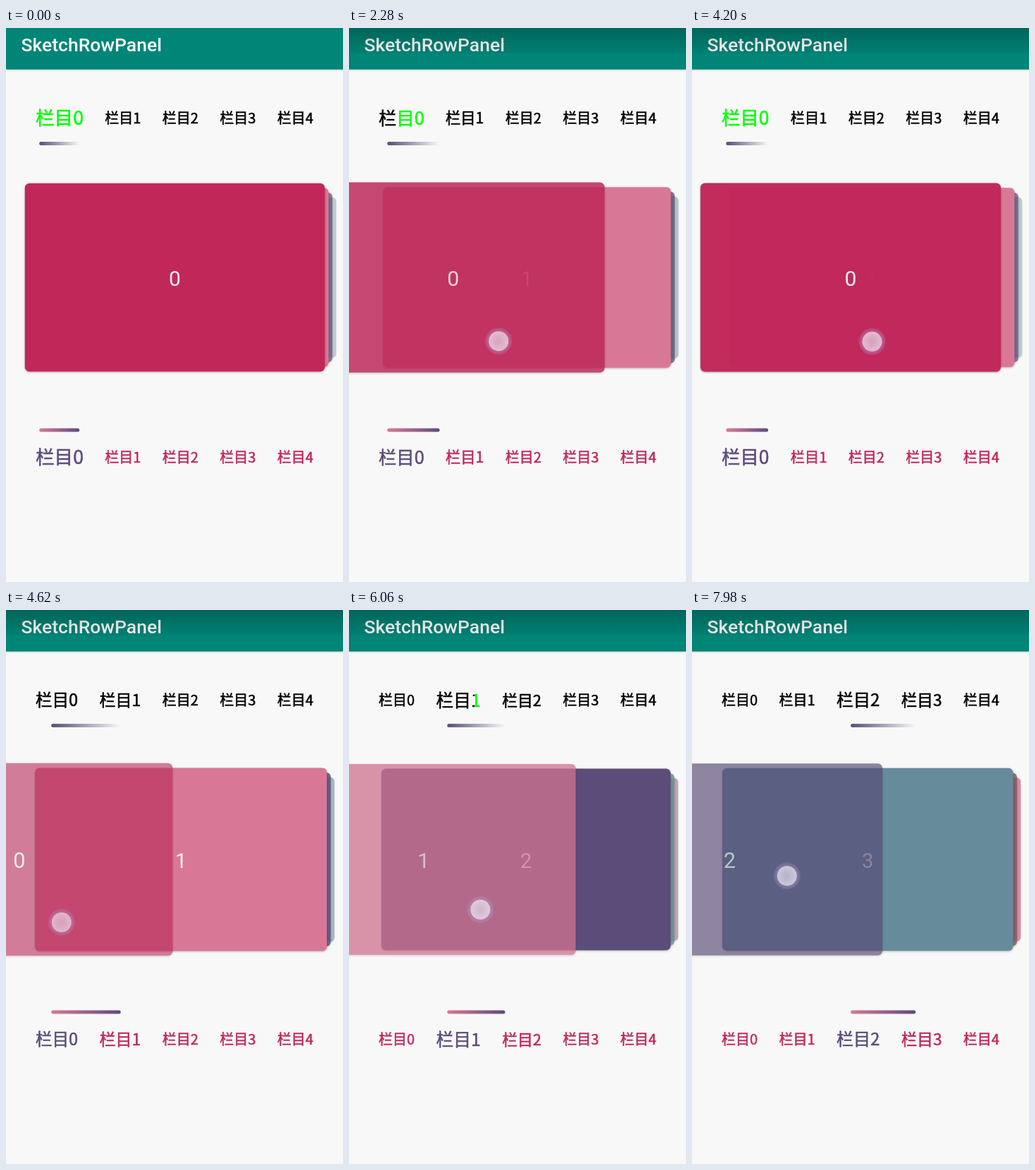
An HTML page that plays this animation: 478x784 px, repeating every 8000 ms.

```html
<!DOCTYPE html>
<html lang="zh">
<head>
<meta charset="utf-8">
<title>SketchRowPanel</title>
<style>
  html, body { margin: 0; width: 100%; height: 100%; overflow: hidden; background: #f8f8f8; }
  svg { display: block; width: 478px; height: 784px; }
  .title { font: 500 26.5px Roboto, sans-serif; fill: #fff; }
  .tab { font-family: "Noto Sans CJK SC", "Noto Sans CJK", sans-serif; font-weight: 500; stroke-width: .55px; stroke-linejoin: round; }
  .card { filter: drop-shadow(0 1px 1.5px rgba(0, 0, 0, .28)); }
  .card text { font: 30px Roboto, sans-serif; fill: #fff; fill-opacity: .93; text-anchor: middle; }
  .bar { filter: drop-shadow(0 1px 1px rgba(0, 0, 0, .18)); }
</style>
</head>
<body>
<svg viewBox="0 0 478 784">
  <defs>
    <linearGradient id="shade" x2="0" y2="1">
      <stop offset="0" stop-opacity=".24"/>
      <stop offset="1" stop-opacity=".04"/>
    </linearGradient>
    <linearGradient id="fade">
      <stop offset="0" stop-color="#5b4c7a"/>
      <stop offset="1" stop-color="#5b4c7a" stop-opacity="0"/>
    </linearGradient>
    <linearGradient id="blend">
      <stop offset="0" stop-color="#d97896"/>
      <stop offset="1" stop-color="#5b4c7a"/>
    </linearGradient>
    <radialGradient id="tip">
      <stop offset="0" stop-color="#fff" stop-opacity=".42"/>
      <stop offset="1" stop-color="#fff" stop-opacity=".6"/>
    </radialGradient>
  </defs>
  <rect width="478" height="784" fill="#f8f8f8"/>
  <rect class="bar" width="478" height="58.7" fill="#008577"/>
  <text class="title" x="21.5" y="33">SketchRowPanel</text>
  <rect id="dim" width="478" height="36" fill="url(#shade)"/>
  <g id="tabs"></g>
  <rect id="topLine" y="161" height="5" rx="2.5" fill="url(#fade)"/>
  <rect id="lowLine" y="566.5" height="5" rx="2.5" fill="url(#blend)"/>
  <g id="cards"></g>
  <g id="touch">
    <circle r="19" fill="#b59ad0" fill-opacity=".25"/>
    <circle r="16.5" fill="#b59ad0" fill-opacity=".2"/>
    <circle r="14" fill="url(#tip)"/>
  </g>
</svg>
<script>
const LOOP = 8000, PAGE = 478, CX = 239.5, CY = 353;
const COLORS = ['#c2275a', '#d97896', '#5b4c7a', '#668c9c', '#7f5a60'];

// Each swipe: finger down, drag, lift at a page position, then settle.
const SWIPES = [
  { down: 1260, drag: 1740, lift: 3190, end: 3770, from: 0, at: .462, to: 0, pow: .89, x: 304, y: [445, 440] },
  { down: 3930, drag: 3930, lift: 4600, end: 5190, from: 0, at: .4, to: 1, pow: 2.85, x: 270, y: [445, 442] },
  { down: 5430, drag: 5430, lift: 6480, end: 7020, from: 1, at: 1.6, to: 2, pow: 1.5, x: 320, y: [430, 420] },
  { down: 7230, drag: 7230, lift: 8000, end: 8500, from: 2, at: 2.4015, to: 3, pow: 1.2, x: 321, y: [386, 376] }
];

const $ = id => document.getElementById(id);
const clamp = v => Math.max(0, Math.min(1, v));
const mix = (a, b, u) => a + (b - a) * u;

function make(tag, attrs, parent) {
  const el = document.createElementNS('http://www.w3.org/2000/svg', tag);
  set(el, attrs);
  parent.append(el);
  return el;
}

function set(el, attrs) {
  for (const k in attrs) el.setAttribute(k, attrs[k]);
}

const tabs = [0, 1, 2, 3, 4].map(i => {
  const grad = make('linearGradient', { id: 'ink' + i }, document.querySelector('defs'));
  const stops = ['a', 'b'].map(() => make('stop', {}, grad));
  const label = ink => {
    const el = make('text', { class: 'tab', fill: ink, stroke: ink }, $('tabs'));
    el.textContent = '栏目' + i;
    return el;
  };
  return { stops, top: label(`url(#ink${i})`), low: label('#c2275a') };
});

const cards = [];
for (let i = 5; i >= 0; i--) {
  const box = make('g', {}, $('cards'));
  const size = { x: -212.75, y: -133.2, width: 425.5, height: 266.4, rx: 6.5 };
  const under = make('rect', size, box);
  const face = make('g', { class: 'card' }, box);
  make('rect', { ...size, fill: COLORS[i % 5] }, face);
  make('text', { y: 12 }, face).textContent = i;
  cards[i] = { box, under, face };
}

function dragPos(s, t) {
  return mix(s.from, s.at, clamp((t - s.drag) / (s.lift - s.drag)) ** s.pow);
}

function pagePos(s, t) {
  if (t < s.lift) return dragPos(s, t);
  const left = 1 - clamp((t - s.lift) / (s.end - s.lift));
  return mix(s.to, s.at, left ** 3);
}

function drawTabs(p) {
  let x = 42;
  tabs.forEach((tab, i) => {
    const d = p - i;
    const size = 20 + 6.6 * clamp(1 - Math.abs(d));
    const drop = size * .37;
    const low = Math.round(p) === i ? '#5b4c7a' : '#c2275a';
    set(tab.top, { x, y: 127.5 + drop, 'font-size': size });
    set(tab.low, { x, y: 607.5 + drop, 'font-size': size, fill: low, stroke: low });

    // Green wipes out from the left when leaving, wipes in from the left when entering.
    const cut = d >= 0 ? clamp(11 * d * d) : clamp(1 + 2.2 * d);
    const ink = d >= 0 ? ['#000', '#0f0'] : ['#0f0', '#000'];
    tab.stops.forEach((s, k) => set(s, { offset: cut, 'stop-color': ink[k] }));
    x += size * 2.555 + 30.4;
  });

  const frac = p % 1;
  const width = 57 + 90 * Math.min(frac, 1 - frac);
  const left = 75.7 + 81.8 * p - width / 2;
  set($('topLine'), { x: left, width });
  set($('lowLine'), { x: left, width });
}

function drawCards(p) {
  cards.forEach(({ box, under, face }, i) => {
    const d = i - p;
    const shown = d > -1 && (d < 3 || i === 3);
    box.style.display = shown ? '' : 'none';
    if (!shown) return;
    const x = CX + d * (d < 0 ? PAGE : 16);
    const alpha = d < 0 ? 1 + d : clamp(1 - (d - 1) / 3);
    face.style.opacity = alpha;
    // The elevation shadow shows through a translucent card.
    under.style.opacity = alpha < 1 ? .16 * alpha : 0;
    set(box, { transform: `translate(${x} ${CY}) scale(${1 - .05 * d})` });
  });
}

function drawTouch(s, t) {
  const u = clamp((t - s.drag) / (s.lift - s.drag));
  const x = s.x - (dragPos(s, t) - s.from) * PAGE;
  set($('touch'), {
    transform: `translate(${x} ${mix(s.y[0], s.y[1], u)})`,
    opacity: clamp((t - s.down + 15) / 45) * clamp(1 - (t - s.lift) / 210)
  });
}

function draw(t) {
  const s = SWIPES.filter(w => w.down <= t).pop() || SWIPES[0];
  const p = pagePos(s, t);
  $('dim').style.display = t < 180 ? 'none' : '';
  drawTabs(p);
  drawCards(p);
  drawTouch(s, t);
}

const start = performance.now();
function tick(now) {
  draw(Math.max(0, now - start) % LOOP);
  requestAnimationFrame(tick);
}
draw(0);
requestAnimationFrame(tick);
</script>
</body>
</html>
```
